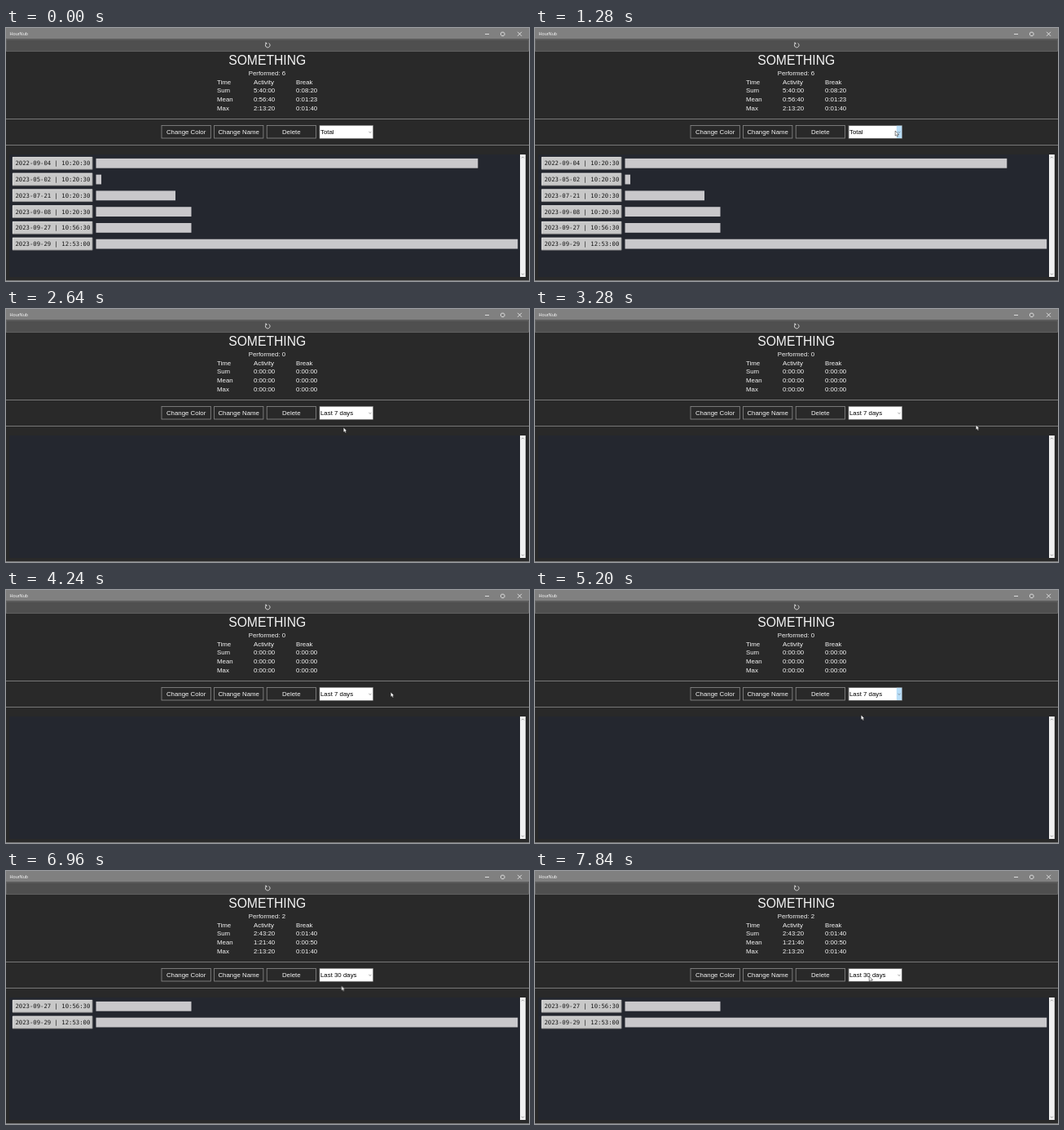
An HTML page for the animation above (8 s loop, 642x310 px).

```html
<!DOCTYPE html>
<html lang="en">
<head>
<meta charset="utf-8">
<title>HourNub</title>
<style>
  html, body { margin: 0; width: 100%; height: 100%; overflow: hidden; background: #292929; }
  svg { display: block; width: 642px; height: 310px; }
  text { font: 7.85px "Liberation Sans", Arial, sans-serif; fill: #f4f4f4; white-space: pre; }
  .mid { text-anchor: middle; }
  .title { font-size: 15.7px; }
  .app { font-size: 5.6px; }
  .date { font: 7.28px "DejaVu Sans Mono", monospace; fill: #161616; }
  .choice { fill: #000; }
  .icon { fill: none; stroke: #f4f4f4; stroke-width: .8; }
  .chevron { fill: none; stroke: #666; stroke-width: .6; }

  .view, .hover, .pressed, .cursor { animation: 8s step-end infinite; }
  .hover, .pressed { opacity: 0; }
  .total { animation-name: total; }
  .week { animation-name: week; }
  .month { animation-name: month; }
  .hover { animation-name: hover; }
  .pressed { animation-name: pressed; }
  .cursor { animation-name: appear; }
  .path { animation: path 8s infinite; }

  @keyframes total { 0% { visibility: visible } 33%, 100% { visibility: hidden } }
  @keyframes week { 0% { visibility: hidden } 33% { visibility: visible } 74%, 100% { visibility: hidden } }
  @keyframes month { 0% { visibility: hidden } 74%, 100% { visibility: visible } }
  @keyframes hover { 0% { opacity: 0 } 10% { opacity: 1 } 33% { opacity: 0 } 55% { opacity: 1 } 74% { opacity: 0 } 88%, 100% { opacity: 1 } }
  @keyframes pressed { 0% { opacity: 0 } 16% { opacity: 1 } 33% { opacity: 0 } 60% { opacity: 1 } 74%, 100% { opacity: 0 } }
  @keyframes appear { 0% { opacity: 0 } 10%, 100% { opacity: 1 } }
  /* 1% is one 80 ms step */
  @keyframes path {
    0%, 10% { transform: translate(448px, 126px); animation-timing-function: steps(1) }
    11% { transform: translate(442px, 126px) }
    18% { transform: translate(442px, 126px); animation-timing-function: steps(7) }
    25% { transform: translate(411px, 142px); animation-timing-function: steps(2) }
    27% { transform: translate(413px, 145px); animation-timing-function: step-end }
    30% { transform: translate(414px, 145px) }
    35% { transform: translate(414px, 145px); animation-timing-function: steps(2) }
    37% { transform: translate(457px, 145px) }
    38% { transform: translate(457px, 145px); animation-timing-function: steps(3) }
    41% { transform: translate(541px, 142px) }
    46% { transform: translate(541px, 142px); animation-timing-function: steps(7) }
    53% { transform: translate(472px, 125px); animation-timing-function: steps(4) }
    57% { transform: translate(423px, 124px) }
    61% { transform: translate(423px, 124px); animation-timing-function: steps(4) }
    65% { transform: translate(400px, 153px) }
    81% { transform: translate(400px, 153px); animation-timing-function: steps(11) }
    92% { transform: translate(421px, 130px); animation-timing-function: steps(3) }
    95%, 100% { transform: translate(410px, 129px) }
  }
</style>
</head>
<body>
<svg viewBox="0 0 642 310">
  <rect width="642" height="310" fill="#292929"/>
  <rect width="642" height="13.5" fill="#808080"/>
  <text class="app" x="4.5" y="8.8">HourNub</text>
  <g class="icon">
    <path d="M588 7.5h5M628 4.8l5 5m0-5l-5 5"/>
    <path d="M608.3 5.2h2.6l1 1v2.4l-1 1h-2.4l-1-1v-2.4z"/>
  </g>
  <rect x=".5" y="14" width="641" height="14.5" fill="#4f4f4f" stroke="#707070" stroke-width=".7"/>
  <path class="icon" d="M319.6 18.8a2.8 2.8 0 1 0 3-.2M318 18.2h1.8v1.8"/>
  <text class="title mid" x="320.7" y="45">SOMETHING</text>

  <path d="M0 111.5H642M0 143.5H642" stroke="#777"/>
  <g id="buttons" fill="#292929" stroke="#8c8c8c" stroke-width=".8"></g>

  <rect x="385" y="119.5" width="65.5" height="15.8" fill="#fff" stroke="#8a8a8a" stroke-width=".5"/>
  <rect class="hover" x="385" y="119.5" width="65.5" height="15.8" fill="none" stroke="#444" stroke-width=".5"/>
  <rect class="pressed" x="443.8" y="119.8" width="6.5" height="15.2" fill="#b9def8"/>
  <path class="chevron" d="M445.4 127l1.6 1.4 1.6-1.4"/>

  <rect x="4" y="155" width="627" height="150" fill="#24272f"/>
  <rect x="631" y="155" width="6.8" height="150" fill="#f1f1f1"/>
  <path class="chevron" d="M632.9 159.4l1.5-1.5 1.5 1.5M632.9 300.8l1.5 1.5 1.5-1.5"/>
  <path d="M0 309.5H642" stroke="#777"/>

  <g id="views"></g>
  <g class="cursor"><g class="path">
    <path d="M.2 0v6.1l1.4-1.2 1 2.1 1.1-.5-.9-2h1.8z" fill="#fff" stroke="#111" stroke-width=".5"/>
  </g></g>
</svg>
<script>
  const text = (x, y, s, cls = "") => `<text class="${cls}" x="${x}" y="${y}">${s}</text>`;

  document.getElementById("buttons").innerHTML = [
    [191, "Change Color"], [255.6, "Change Name"], [320.2, "Delete"]
  ].map(([x, s]) =>
    `<rect x="${x}" y="119.5" width="60.3" height="15.5"/>
     <g stroke="none">${text(x + 30.1, 130, s, "mid")}</g>`).join("");

  const sessions = [
    ["2022-09-04 | 10:20:30", 579.3],
    ["2023-05-02 | 10:20:30", 117],
    ["2023-07-21 | 10:20:30", 208],
    ["2023-09-08 | 10:20:30", 227.5],
    ["2023-09-27 | 10:56:30", 227.5],
    ["2023-09-29 | 12:53:00", 628.2]
  ];

  const row = ([date, end], i) => {
    const y = 158 + i * 19.77;
    return `<rect x="8" y="${y}" width="98.2" height="15.4" fill="#c8c8c8"/>
      <path d="M8.3 ${y + 15}v-14.7h97.6" fill="none" stroke="#eee" stroke-width=".6"/>
      <path d="M8 ${y + 15.2}h98v-15" fill="none" stroke="#777" stroke-width=".6"/>
      ${text(11.5, y + 10.3, date, "date")}
      <rect x="110.5" y="${y + 1.9}" width="${end - 110.5}" height="11.8" fill="#c9c8cb"/>`;
  };

  const view = (name, choice, list, activity, pause) => {
    const columns = [[259, ["Time", "Sum", "Mean", "Max"]],
      [304, ["Activity", ...activity]], [356, ["Break", ...pause]]];
    return `<g class="view ${name}">
      ${text(320.4, 57.8, "Performed: " + list.length, "mid")}
      ${columns.map(([x, cells]) =>
        cells.map((s, i) => text(x, 68.6 + i * 10.7, s)).join("")).join("")}
      ${text(386, 130, choice, "choice")}
      ${list.map(row).join("")}</g>`;
  };

  const none = Array(3).fill("0:00:00");
  document.getElementById("views").innerHTML =
    view("total", "Total", sessions,
      ["5:40:00", "0:56:40", "2:13:20"], ["0:08:20", "0:01:23", "0:01:40"]) +
    view("week", "Last 7 days", [], none, none) +
    view("month", "Last 30 days", sessions.slice(-2),
      ["2:43:20", "1:21:40", "2:13:20"], ["0:01:40", "0:00:50", "0:01:40"]);
</script>
</body>
</html>
```
